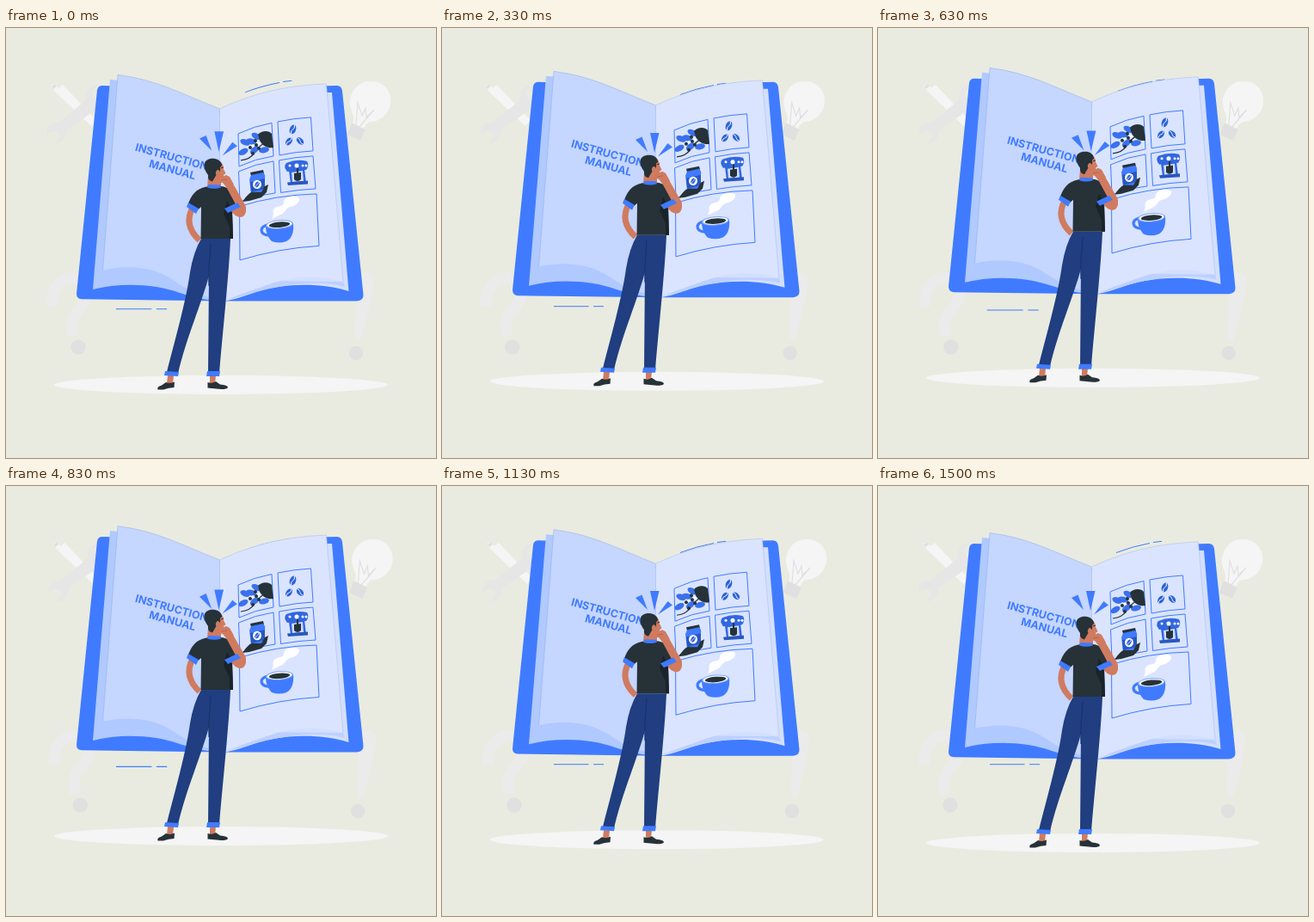
These frames come from a looping animation (500x500 px, 1540 ms). An HTML page with a canvas:

```html
<!DOCTYPE html>
<html lang="en">
<head>
<meta charset="utf-8">
<title>Instruction manual</title>
<style>
  html, body { margin: 0; width: 100%; height: 100%; overflow: hidden; background: #e9ebe0; }
  canvas { display: block; width: 100vw; height: 100vh; }
</style>
</head>
<body>
<canvas id="stage"></canvas>
<script>
const LOOP = 1540;
const SIZE = 500;
const BLUE = '#407bff', DARK = '#263238', SHADE = '#192329', SKIN = '#d07b60',
      NAVY = '#203e80', PALE = '#f5f5f5', MIST = '#ebebeb', STEEL = '#e6e6e6',
      GREY = '#e0e0e0', WHITE = '#fff';

const canvas = document.getElementById('stage');
const ctx = canvas.getContext('2d');
const ratio = window.devicePixelRatio || 1;
canvas.width = canvas.height = SIZE * ratio;

const fill = (d, color) => {
  ctx.fillStyle = color;
  ctx.fill(new Path2D(d));
};

const line = (d, color = BLUE, width = 1) => {
  ctx.strokeStyle = color;
  ctx.lineWidth = width;
  ctx.stroke(new Path2D(d));
};

const oval = (x, y, rx, ry, color, turn = 0) => {
  ctx.fillStyle = color;
  ctx.beginPath();
  ctx.ellipse(x, y, rx, ry, turn, 0, 7);
  ctx.fill();
};

const group = (draw, x = 0, y = 0) => {
  ctx.save();
  ctx.translate(x, y);
  draw();
  ctx.restore();
};

// Motion
const bob = t => -4.2 * (1 - Math.cos((t + 50) / LOOP * 2 * Math.PI));

const sway = t => t > 170 && t < 1000 ? -2.5 * Math.sin((t - 170) / 415 * Math.PI) : 0;

const beat = (t, start, length, strength) => {
  const p = ((t - start + LOOP) % LOOP) / length;
  return p < 1 ? strength * Math.sin(p * Math.PI) : 0;
};

const pulse = t => 1 + beat(t, -30, 360, 0.085) + beat(t, 577, 286, 0.06);

const pulsing = (t, draw) => group(() => {
  const s = pulse(t);
  ctx.translate(226, 194);
  ctx.scale(s, s);
  ctx.translate(-226, -194);
  draw();
});

function drawBackdrop() {
  // Screwdriver and wrench
  fill('M52 67L57 65 61 70 66 66 106 108 99 114 57 74Z', PALE);
  fill('M53 68L57 65 59 68 55 71Z', GREY);
  fill('M47 124C46 115 53 108 61 110L93 84C92 74 97 67 107 66L99 75 103 83 110 84V94L100 98 70 119C71 127 65 135 56 134L63 126 60 121 54 120Z', STEEL);

  // Light bulb
  fill('M402 112C409 103 398 96 400 83C403 68 414 61 426 62C440 63 449 74 447 88C445 102 433 109 424 109C419 110 417 115 416 119Z', PALE);
  line('M407 113L409 87 414 102 418 93 419 104 428 95M410 116L428 95', GREY, 1.2);
  fill('M402 110L418 118 412 131 397 124Z', GREY);

  // Question and exclamation marks
  line('M54 324C51 302 66 288 82 291C101 297 95 316 86 326C76 336 75 344 78 358', MIST, 13);
  oval(84, 371, 8.7, 8.7, GREY);
  fill('M407 288Q418 280 427 289Q429 305 413 361Q409 366 406 360Z', MIST);
  oval(407, 378, 8.2, 8.2, GREY);
}

function drawSparks() {
  line('M277 77.5Q295 70.5 316 66.5M320 65.5L330 64.3', BLUE, 1);
  line('M130 323.7H170.5M176 323.7H188', BLUE, 1);
}

function drawRays() {
  fill('M225 130L232.5 126.5 239 144Z', BLUE);
  fill('M242 122H252.5L247 145Z', BLUE);
  fill('M262.5 134L268 138.5 251 149.5Z', BLUE);
}

function drawBook() {
  fill('M112 67Q107 67 106 72L82 309Q82 315 88 315.3L250 317.5 408 317.5Q416 317 415.5 310L391 73Q390 67 385 67L340 68 248 96 150 68Z', BLUE);

  // Left leaf
  fill('M121 60L132 61 248 99V317.5C235 317 217 313 202 308C172 297 132 296 101 304Z', '#b0c9ff');
  fill('M130 54.5C175 60 205 77 248.5 94V315C232 313 212 306 194 293C172 278 140 275 112.5 282Z', '#c5d6ff');
  line('M112.5 282L130 54.5C175 60 205 77 248.5 94', '#91abdf', 0.5);

  // Right leaf
  fill('M371 75H379L398.5 306C370 297 335 297 305 303C285 308 270 315 255 317.5L248 316V100Z', '#d2dfff');
  fill('M392 295L394 301Q375 296 350 297C315 299 285 308 260 316L300 294Z', '#bdd0ff');
  fill('M248.5 94C290 75 325 67 372.5 65L392 295C365 288 340 288 315 295C290 303 270 312 248.5 316Z', '#dae4ff');
  line('M248.5 94C290 75 325 67 372.5 65L392 295', '#a4b9e4', 0.5);
  line('M248.5 94V190', '#aabfec', 0.7);
}

function drawTitle() {
  ctx.fillStyle = BLUE;
  ctx.font = '700 12.5px Inter, "Open Sans", sans-serif';
  [['INSTRUCTION', 149.5, 142.5], ['MANUAL', 165.5, 161.5]].forEach(([word, x, y]) => group(() => {
    ctx.rotate(0.27);
    ctx.fillText(word, 0, 0);
  }, x, y));
}

function drawBean(x, y, turn, size = 1) {
  group(() => {
    ctx.rotate(turn);
    ctx.scale(size, size);
    oval(0, 0, 3.6, 5.6, '#2c62d9');
    line('M0 -5.5Q2 -2 0 0T0 5.5', WHITE, 0.9);
  }, x, y);
}

function drawHarvest() {
  line('M273 154Q284 153 289 145T303 132', DARK, 1.2);
  [[278, 133, 0.4], [276, 144, -0.5], [291, 126, 0.5], [285, 132, 0.2], [289, 142, -0.7], [300, 142, -0.2]]
    .forEach(([x, y, turn]) => oval(x, y, 6, 3.4, '#3a70eb', turn));
  fill('M293 124C297 119 306 119 309 123L311 139C305 140 299 138 295 131Z', DARK);
  [[284, 139], [291, 136], [290, 131], [294, 140], [287, 146]]
    .forEach(([x, y]) => oval(x, y, 2, 2, DARK));
  [[294, 134], [287, 137]].forEach(([x, y]) => oval(x, y, 1.5, 1.5, WHITE));
}

function drawJar() {
  fill('M284 168L299 165 300 169 285 172Z', DARK);
  fill('M285 171L299 168Q302 171 301 175V190Q294 195 285 192L283 176Z', BLUE);
  fill('M284 179L301 175V187L285 191Z', '#2857bf');
  oval(292, 182, 5, 5.2, WHITE);
  drawBean(292, 182, 0.5, 0.65);
  fill('M275 202C281 194 284 190 288 191L297 191 301 184 305 182 303 191 297 197 283 201Z', DARK);
}

function drawMachine() {
  fill('M326 157Q338 152 350 155Q353 160 349 165L327 167Q322 161 326 157Z', '#3267df');
  fill('M329 166L347 164 349 180 331 181Z', '#3267df');
  fill('M332 168L345 166 346 178 333 179Z', '#cedcff');
  fill('M327 179.5L351 177.5V181.5L328 183Z', '#2857bf');
  fill('M335 169L343 168 343 176Q339 180 335 176Z', DARK);
  line('M339 163V170', DARK, 2);
  oval(338, 160, 2.5, 2.5, WHITE);
  [330, 345, 349].forEach(x => oval(x, 160, 1.5, 1.5, WHITE));
}

function drawCup() {
  fill('M309 222C313 216 308 212 313 209C319 206 323 208 323 202C324 196 336 194 341 198C342 203 336 207 330 208C324 210 326 215 317 218Z', WHITE);
  ctx.save();
  ctx.lineCap = 'round';
  line('M307 229C293 229 294 243 309 241', BLUE, 3.2);
  ctx.restore();
  fill('M302 229L334 227C335 238 332 245 326 248Q318 251 309 248C303 242 302 235 302 229Z', BLUE);
  oval(318, 228.5, 16, 5.2, '#7da5ff', -0.08);
  oval(318, 228.5, 14.5, 4.2, WHITE, -0.08);
  oval(318, 228.8, 12.2, 3.2, DARK, -0.08);
}

function drawPanels() {
  line('M270 123Q289 114 309 110.5L311 149Q290 152 271 161Z');
  line('M316 109Q335 105 354.5 104L357 143Q337 144 318 148Z');
  line('M270.5 167Q290 158 311 155L313 192Q292 194 272 202Z');
  line('M317.5 154Q337 150 357 149L360 187Q340 188 319.5 191.5Z');
  line('M271.5 207.5Q315 194 361 193L364 253.5Q318 256 272 270Z');
  drawHarvest();
  drawBean(333.5, 118, 0.35);
  drawBean(329, 132, 0.65, 0.9);
  drawBean(342, 131.5, -0.75, 0.9);
  drawJar();
  drawMachine();
  drawCup();
}

function drawMan() {
  // Feet
  fill('M188 404L195 404 194 414 187 414Z', SKIN);
  fill('M237 404H244L243 414H237Z', SKIN);
  fill('M186 412Q191 414 196 411.5L195.5 418Q189 418 183 420.5H176.5Q175 417 181 415.5Z', DARK);
  fill('M234.5 412Q240 414 244 411L249 414.5Q258 415 258 418Q257 420 250 420L234.5 418.5Z', DARK);

  // Trousers
  fill('M227 245H261C259 290 252 353 248 402H235L236 288C228 319 209 362 200 402L187 400C199 354 210 314 214 284Q218 260 227 245Z', NAVY);
  line('M238 251C237 272 235 280 236 300', '#18316a', 1);
  fill('M185 399L201 400 200 405 184 404Z', BLUE);
  fill('M234 399H249L248 405H233Z', BLUE);

  // Far arm
  line('M217 209C210 222 212 235 225 247', SKIN, 7);
  fill('M235 173H250V186Q242 190 234 185Z', SKIN);

  // Shirt
  fill('M233 184.5L250 184C259 185 263 190 266 198L272 207 263 215 264 245H226.5L227 208 221 213 211 207C215 195 220 187 233 184.5Z', DARK);
  fill('M257 201L253 216 260 231V245H264L263 211Z', SHADE);
  fill('M234 185.5L235.5 182 249 182.5 250 185.5Q242 188 234 185.5Z', BLUE);
  fill('M212 203L224 210 221 216 210 208Z', BLUE);

  // Near arm
  fill('M268 207L276 202C280 209 280 215 276 219C270 222 265 217 262 213Z', SKIN);
  fill('M254 181L260 175C266 184 274 198 279 208Q280 217 273 219Q269 213 267 205Z', SKIN);
  fill('M254 210L269 203 273 208 258 215Z', BLUE);

  // Head and hand
  fill('M240 156C249 152 253 158 253 164L255.5 169 253 171 253 176C247 180 239 178 237 173Z', SKIN);
  fill('M230.5 160C230 153 238 151 243 152C248 153 251 156 251 160L249 162C250 167 247 169 245 170L240 178.5Q234 177 235 171Q231 166 230.5 160Z', DARK);
  oval(246, 168, 2, 3, SKIN, 0.3);
  line('M250 163L253 162', DARK, 1);
  fill('M249 174L256 171 260 173 265 182 257 186 252 180 247 179Z', SKIN);
  line('M250 177L257 176', '#a95843', 0.6);
}

function drawFigure() {
  oval(250, 415, 194, 11, PALE);
  drawBook();
  drawTitle();
  drawPanels();
  drawMan();
}

function render(now) {
  const t = now % LOOP;
  ctx.setTransform(ratio, 0, 0, ratio, 0, 0);
  ctx.fillStyle = '#e9ebe0';
  ctx.fillRect(0, 0, SIZE, SIZE);
  group(drawBackdrop, sway(t), 0);
  pulsing(t, drawSparks);
  group(drawFigure, 0, bob(t));
  pulsing(t, drawRays);
}

const start = performance.now();
function tick() {
  render(Math.max(0, performance.now() - start));
  requestAnimationFrame(tick);
}
tick();
</script>
</body>
</html>
```
